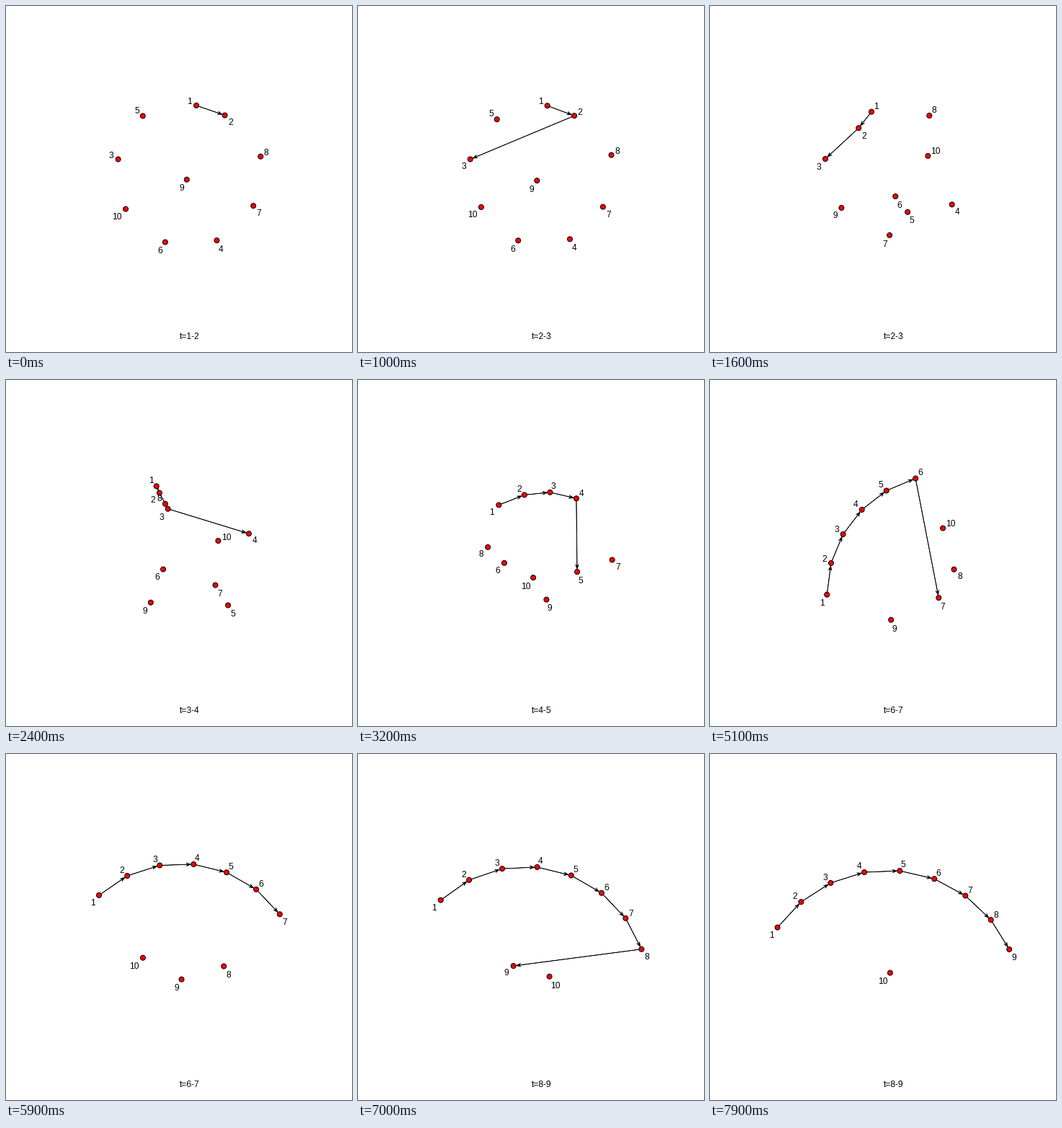
Animation of 480x480 px, one loop 8 s. Source, as a matplotlib script:

```python
import numpy as np
import matplotlib.pyplot as plt
from matplotlib.animation import FuncAnimation
from matplotlib.patches import Circle, Polygon

SIZE, DPI = 480, 100
PX = 72 / DPI            # one pixel in points
TWEEN = 10               # frames per slice
N = 10                   # vertices
RADIUS = 3.5
HOP = 47.4               # ideal edge length
CENTRE = np.array([254.4, 232.8])

# per slice: rough clockwise order around a ring, heading of the chain (degrees)
# a vertex missing from the ring starts in its middle
SLICES = [
    ("1 2 8 7 4 6 10 3 5", 19),
    ("8 10 4 5 7 9 3 2 1", 129.5),
    ("1 2 3 4 7 5 9 6 8", 9),
    ("1 2 3 4 5 6 9 7 8 10", -58),
    ("1 2 3 4 5 6 10 8 7 9", -58),
    ("1 2 3 4 5 6 7 8 9 10", 6),
    ("1 2 3 4 5 6 7 8 10 9", 14.2),
    ("1 2 3 4 5 6 7 8 9 10", 5.4),
]


def relax(z, want, rounds=1500):
    """Stress majorization: move points until gaps come close to `want`."""
    w = want ** -2.0
    np.fill_diagonal(w, 0)
    solve = np.linalg.pinv(np.diag(w.sum(axis=1)) - w)
    for _ in range(rounds):
        gap = np.abs(z[:, None] - z)
        np.fill_diagonal(gap, 1)
        b = -w * want / gap
        np.fill_diagonal(b, -b.sum(axis=1))
        z = solve @ (b @ z)
    return z


def layout(order, heading, last):
    """Vertices 0..last form a chain, the others are unconnected."""
    ring = [int(k) - 1 for k in order.split()]
    z = np.zeros(N, complex)
    z[ring] = 2 * HOP * np.exp(2j * np.pi * np.arange(len(ring)) / len(ring))

    i = np.arange(N)
    hops = np.abs(i[:, None] - i).astype(float)
    hops[np.maximum(i[:, None], i) > last] = np.sqrt(N)
    np.fill_diagonal(hops, 1)
    z = relax(z, HOP * hops)

    z *= np.exp(1j * (np.radians(heading) - np.angle(z[last] - z[0])))
    pos = np.column_stack([z.real, z.imag])
    return pos - (pos.min(axis=0) + pos.max(axis=0)) / 2 + CENTRE


LAYOUTS = [layout(order, heading, s + 1)
           for s, (order, heading) in enumerate(SLICES)]


def unit(v):
    return v / max(np.hypot(*v), 1e-9)


def arrow(p, q):
    """Thin shaft with a notched head, from rim to rim."""
    u = unit(q - p)
    n = np.array([-u[1], u[0]])
    a, tip = p + RADIUS * u, q - RADIUS * u
    neck, barb = tip - 4 * u, tip - 7 * u
    w, h = 0.2 * n, 2.4 * n
    return np.array([a + w, neck + w, barb + h, tip, barb - h, neck - w, a - w])


def label_dirs(pos, last):
    """Labels point away from chain neighbours, or from the centroid."""
    out = pos - pos.mean(axis=0)
    for i in range(last + 1):
        near = [j for j in (i - 1, i + 1) if 0 <= j <= last]
        out[i] = sum(unit(pos[i] - pos[j]) for j in near)
    return np.array([unit(v) for v in out])


fig = plt.figure(figsize=(SIZE / DPI, SIZE / DPI), dpi=DPI, facecolor="white")
ax = fig.add_axes([0, 0, 1, 1])
ax.set_xlim(0, SIZE)
ax.set_ylim(SIZE, 0)
ax.axis("off")

font = dict(family="Liberation Sans", size=12 * PX, color="black",
            ha="center", va="baseline", zorder=3)
edges = [ax.add_patch(Polygon(np.zeros((7, 2)), fc="black", ec="black",
                              lw=0.6 * PX, snap=False, zorder=1))
         for _ in range(N - 2)]
dots = [ax.add_patch(Circle((0, 0), RADIUS, fc="red", ec="black", lw=PX,
                            snap=False, zorder=2))
        for _ in range(N)]
labels = [ax.text(0, 0, str(i + 1), **font) for i in range(N)]
caption = ax.text(254.5, 462, "", **font)


def draw(frame):
    s, k = divmod(frame, TWEEN)
    t = (k + 1) / TWEEN
    v = t * t * (3 - 2 * t)
    pos = (1 - v) * LAYOUTS[max(s - 1, 0)] + v * LAYOUTS[s]
    last = s + 1

    for i, edge in enumerate(edges):
        edge.set_visible(i < last)
        if i < last:
            edge.set_xy(arrow(pos[i], pos[i + 1]))

    for i, d in enumerate(label_dirs(pos, last)):
        dots[i].center = pos[i]
        half = 3.3 * len(labels[i].get_text())
        x, y = pos[i] + RADIUS * d + np.sign(d) * (half + 2, 6.7)
        labels[i].set_position((x - 0.8, y + 5.6))

    caption.set_text(f"t={s + 1}-{s + 2}")
    return [*edges, *dots, *labels, caption]


anim = FuncAnimation(fig, draw, frames=TWEEN * len(LAYOUTS), interval=100,
                     repeat=True, repeat_delay=0, blit=False)
plt.show()
```
